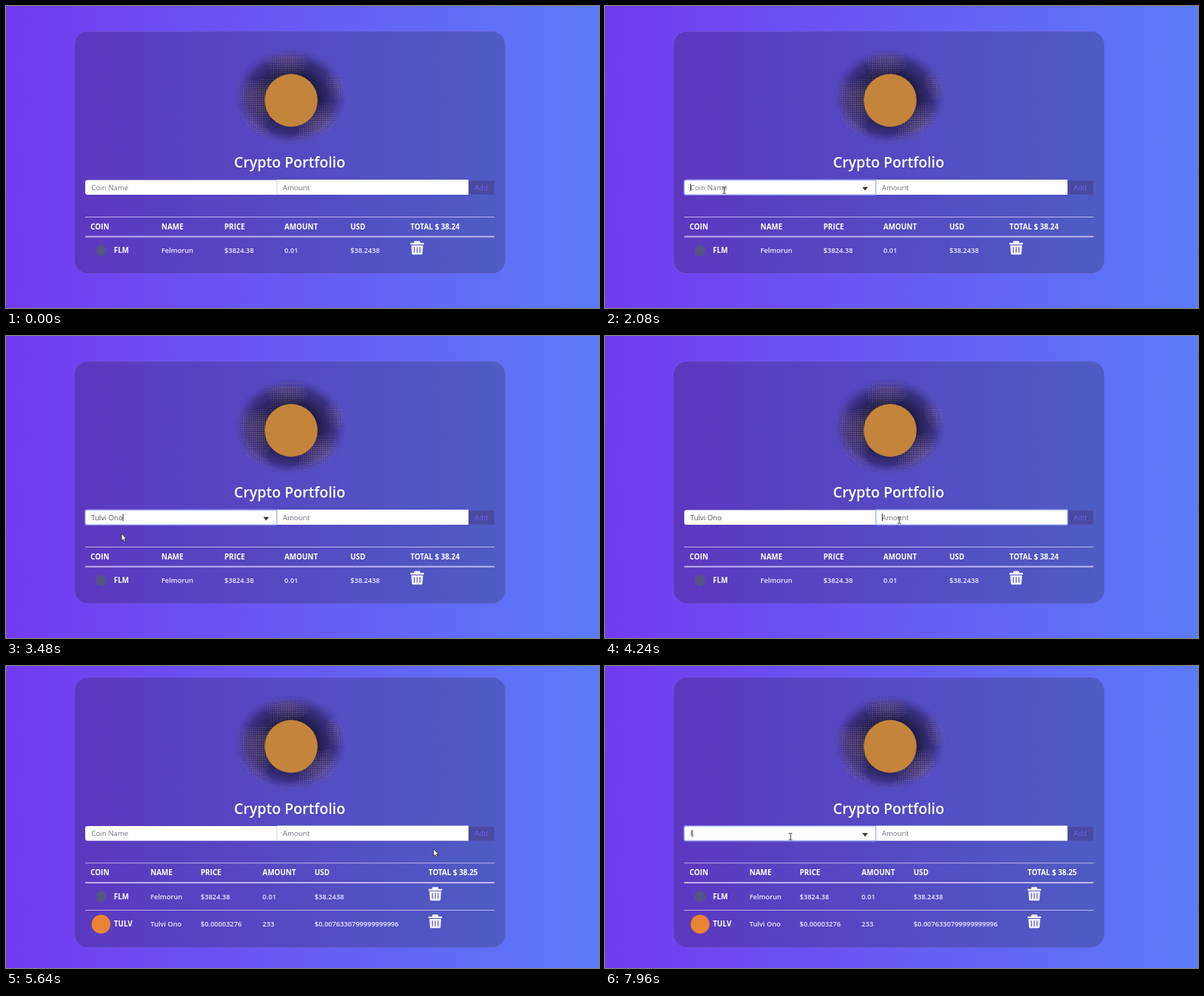
Recreate the animation shown at these times as an HTML page. Size 786 by 400 pixels, loop 8 s.

```html
<!DOCTYPE html>
<html lang="en">
<head>
<meta charset="utf-8">
<title>Portfolio</title>
<style>
  html, body { margin: 0; width: 100%; height: 100%; overflow: hidden; }
  svg { display: block; width: 100%; height: 100%; }
  text { font: 600 9.1px "Open Sans", "Noto Sans", sans-serif; fill: #eeebff; white-space: pre; }
  .bold { font-weight: 700; font-size: 9.7px; fill: #fff; }
  .title { font-weight: 600; font-size: 19.2px; fill: #fff; }
  .field { font-weight: 400; font-size: 9.5px; }
</style>
</head>
<body>
<svg viewBox="0 0 786 400" preserveAspectRatio="none">
  <defs>
    <linearGradient id="sky">
      <stop offset="0" stop-color="#733bf0"/>
      <stop offset="1" stop-color="#5b7bf7"/>
    </linearGradient>
    <radialGradient id="globe">
      <stop offset="0" stop-color="#16132e"/>
      <stop offset=".5" stop-color="#1f1b46" stop-opacity=".95"/>
      <stop offset=".78" stop-color="#30286c" stop-opacity=".75"/>
      <stop offset="1" stop-color="#44389a" stop-opacity="0"/>
    </radialGradient>
    <g id="trash">
      <path d="M5 2.5V1.2Q5 0 6.2 0H11.8Q13 0 13 1.2V2.5H17.5Q18 2.5 18 3V4.8H0V3Q0 2.5 .5 2.5Z" fill="#f5f3ff"/>
      <path d="M1.2 5.8H16.8L16 16.5Q15.9 18 14.4 18H3.6Q2.1 18 2 16.5Z" fill="#f5f3ff"/>
      <path d="M5.3 8V15.5M9 8V15.5M12.7 8V15.5" stroke="#6a62c2" stroke-width="1.3"/>
    </g>
  </defs>
  <rect width="786" height="400" fill="url(#sky)"/>
  <g id="card">
    <rect id="panel" x="90.5" y="33.5" width="571.5" height="321" rx="18" fill="#141414" fill-opacity=".22" stroke="#8a78f0" stroke-opacity=".3"/>
    <ellipse cx="377" cy="120" rx="75" ry="64" fill="url(#globe)"/>
    <path id="dots" fill="#b8909a" opacity=".6"/>
    <circle cx="378" cy="125" r="35" fill="#c4843c"/>
    <text class="title" x="376" y="214" text-anchor="middle">Crypto Portfolio</text>

    <path d="M108 230.5H359V250H108Q105 250 105 247V233.5Q105 230.5 108 230.5Z" fill="#fff"/>
    <rect x="359" y="230" width="254" height="20" fill="#fff"/>
    <path d="M359 230.5V250" stroke="#d5d5e4"/>
    <path id="button" d="M613.5 231.5H647V249.5H613.5Z"/>
    <text id="buttonText" class="field" x="621" y="243.5">Add</text>
    <rect id="ring" y="230.5" width="254" height="19.5" rx="2" fill="none" stroke="#a4b4ff" stroke-opacity=".6" stroke-width="2"/>
    <path id="listArrow" d="M341 239.7H348.5L344.75 244.6Z" fill="#333"/>
    <text id="name" class="field" x="113" y="243.5"></text>
    <text id="amount" class="field" x="367" y="243.5"></text>
    <path id="caret" d="M0 235.5V245" stroke="#222" stroke-width=".9"/>
    <g id="tableBefore"></g>
    <g id="tableAfter"></g>
  </g>
  <g id="pointer">
    <path id="arrow" d="M0 0V9.5L2.2 7.6L3.7 10.8L5.3 10L3.8 7H6.9Z" fill="#fff" stroke="#222" stroke-width=".8"/>
    <path id="beam" d="M-2.3 -4.2H-.6L0 -3.6L.6 -4.2H2.3M0 -3.6V3.6M-2.3 4.2H-.6L0 3.6L.6 4.2H2.3" fill="none" stroke="#333"/>
    <path id="hand" d="M-1 .6Q0 -.8 1 .6V4L5 4.8Q6.2 5.2 6 6.5L5.2 11H-.3L-3.4 7.2Q-3.6 5.9 -2.4 6L-1 7Z" fill="#fff" stroke="#222" stroke-width=".8"/>
  </g>
</svg>
<script>
const LOOP = 8000, ADDED = 5400, SHIFT = 18.5;
const $ = id => document.getElementById(id);
const show = (id, on) => $(id).setAttribute('visibility', on ? 'visible' : 'hidden');

const label = (x, y, text, cls = '') => `<text x="${x}" y="${y}" class="${cls}">${text}</text>`;
const rule = (y, weight) =>
  `<path d="M105 ${y}H647.5" stroke="#d8cef4" stroke-opacity=".8" stroke-width="${weight}"/>`;

function table(columns, total, coins) {
  const titles = ['COIN', 'NAME', 'PRICE', 'AMOUNT', 'USD', 'TOTAL $ ' + total];
  const rows = coins.map(({ symbol, color, radius, cells }, i) => {
    const y = 323.7 + i * 36.5;
    return (i ? rule(y - 18.2, 1) : '') +
      `<circle cx="126" cy="${y + .3}" r="${radius}" fill="${color}"/>` +
      label(143, y + 3.3, symbol, 'bold') +
      cells.map((cell, c) => label(columns[c + 1], y + 3.6, cell)).join('') +
      `<use href="#trash" x="${columns[5]}" y="${y - 12.5}"/>`;
  });
  return rule(279.5, 1) + titles.map((s, i) => label(columns[i], 295.5, s, 'bold')).join('') +
    rule(305.5, 1.8) + rows.join('');
}

const firstCoin = { symbol: 'FLM', color: '#56528a', radius: 7.5,
  cells: ['Felmorun', '$3824.38', '0.01', '$38.2438'] };
const secondCoin = { symbol: 'TULV', color: '#ea8434', radius: 12.5,
  cells: ['Tulvi Ono', '$0.00003276', '233', '$0.0076330799999999996'] };
$('tableBefore').innerHTML = table([112, 206, 289.5, 369, 456.5, 536], '38.24', [firstCoin]);
$('tableAfter').innerHTML = table([112, 191.5, 258, 340, 409, 560], '38.25', [firstCoin, secondCoin]);

// Halftone land masses, denser towards the left and bottom of the globe.
let dots = '';
for (let y = 62; y < 180; y += 2.5) {
  for (let x = 304; x < 450; x += 2.5) {
    const u = (x - 377) / 73, v = (y - 120) / 61, r = Math.hypot(u, v);
    const land = Math.sin(u * 5 + v * 2.5 + 3.8) * .7 + Math.sin(v * 6 - u * 3) * .6 - u * .5 + v * .4 + r * .4;
    if (r > 1 || land < .1) continue;
    const s = Math.min(1.6, .7 + land * .6) * (r > .9 ? .7 : 1);
    dots += `M${x} ${y}h${s}v${s}h${-s}z`;
  }
}
$('dots').setAttribute('d', dots);

// Each entry takes effect at its time and holds until the next one.
const nameSteps = [[0, ''], [2280, 't'], [2440, 'tu'], [2600, 'tul'], [3320, 'Tulvi Ono'], [ADDED, ''], [7760, 'l']];
const amountSteps = [[0, ''], [4420, '2'], [4540, '23'], [4660, '233'], [ADDED, '']];
const focusSteps = [[0, ''], [1680, 'name'], [4180, 'amount'], [5080, ''], [6100, 'name']];
const current = (steps, t) => steps.filter(s => s[0] <= t).pop();

const path = [
  [520, 796, 372], [700, 710, 384], [880, 640, 388], [1320, 150, 252], [1400, 147, 251],
  [1620, 158, 244], [3000, 158, 244], [3200, 150, 262], [3440, 150, 262], [4050, 390, 244],
  [4680, 390, 244], [4960, 641, 246], [5480, 641, 246], [6060, 246, 226]
];
function pointerAt(t) {
  const i = path.findIndex(p => p[0] > t);
  if (i < 0) return path[path.length - 1].slice(1);
  if (i === 0) return path[0].slice(1);
  const [t0, x0, y0] = path[i - 1], [t1, x1, y1] = path[i];
  const k = (t - t0) / (t1 - t0), e = k * k * (3 - 2 * k);
  return [x0 + (x1 - x0) * e, y0 + (y1 - y0) * e];
}

function setField(id, value, placeholder) {
  $(id).textContent = value || placeholder;
  $(id).style.fill = value ? '#495057' : '#6c737c';
}

function draw(t) {
  const added = t >= ADDED, shift = added ? SHIFT : 0;
  $('card').setAttribute('transform', `translate(0 ${-shift})`);
  $('panel').setAttribute('height', added ? 358 : 321);
  show('tableBefore', !added);
  show('tableAfter', added);

  const name = current(nameSteps, t), amount = current(amountSteps, t);
  const [focusTime, focus] = current(focusSteps, t);
  setField('name', name[1], 'Coin Name');
  setField('amount', amount[1], 'Amount');

  const [x, y] = pointerAt(t), row = y + shift;
  const inRow = row > 230 && row < 250;
  const overField = inRow && x > 105 && x < 613;
  const overButton = inRow && x >= 613 && x < 647;
  $('pointer').setAttribute('transform', `translate(${x} ${y})`);
  show('arrow', !overField && !overButton);
  show('beam', overField);
  show('hand', overButton);

  $('button').setAttribute('fill', overButton ? '#5a4a98' : '#4a48a0');
  $('button').setAttribute('stroke', overButton ? '#65508c' : '#504eac');
  $('buttonText').style.fill = overButton ? '#cdc4f2' : '#6c66ea';

  show('ring', focus);
  $('ring').setAttribute('transform', `translate(${focus === 'amount' ? 359 : 105} 0)`);
  show('listArrow', focus === 'name' || (overField && x < 359));

  const [editTime, value] = focus === 'amount' ? amount : name;
  const blinkOn = (t - Math.max(focusTime, editTime)) % 1060 < 530;
  show('caret', focus && blinkOn);
  if (focus) {
    const width = value ? $(focus).getComputedTextLength() : 0;
    $('caret').setAttribute('transform', `translate(${(focus === 'amount' ? 367 : 113) + width + .5} 0)`);
  }
}

function tick() {
  draw(performance.now() % LOOP);
  requestAnimationFrame(tick);
}
tick();
</script>
</body>
</html>
```
